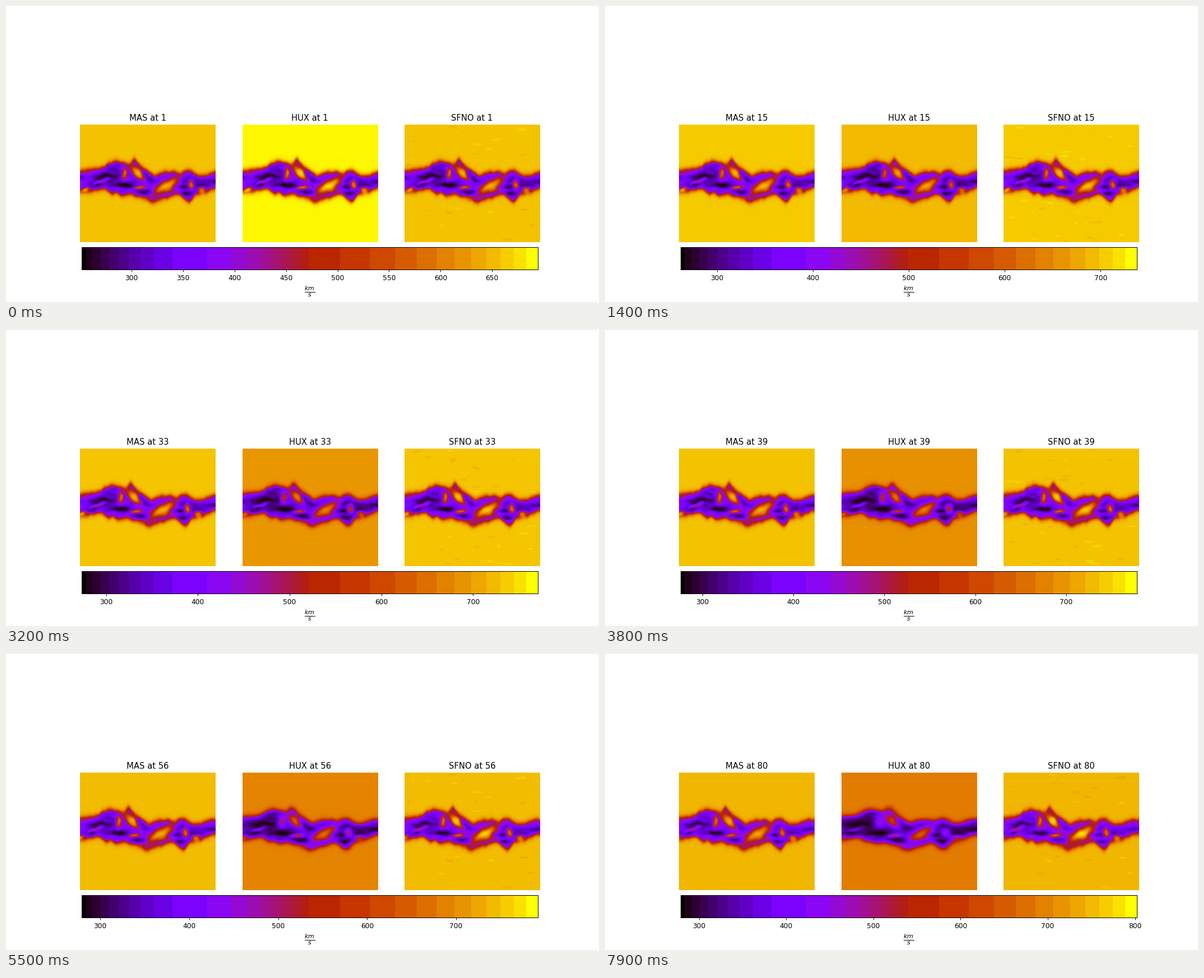
Animation, 1058 px wide and 529 px high, one loop 8 s. Source, as a matplotlib script:

```python
import numpy as np
import matplotlib.pyplot as plt
from matplotlib.animation import FuncAnimation

W, H = 1058, 529
FRAMES = 80
PW, PH, PAD = 242, 210, 40
LEFT, TOP = 132.25, 212.3
CELL = 0.775 * W / 3.4
LEVELS = 30

plt.rcParams["font.family"] = "DejaVu Sans"
rng = np.random.default_rng(4)

# Outline of the slow-wind belt, in stage pixels
UPPER = [(132, 296), (152, 291), (171, 291), (194, 276), (208, 281),
         (221, 281), (229, 274), (240, 287), (263, 303), (285, 297),
         (310, 299), (327, 294), (342, 302), (358, 303), (374, 296)]
LOWER = [(132, 331), (150, 333), (176, 325), (190, 336), (198, 331),
         (207, 339), (222, 337), (245, 341), (262, 351), (277, 343),
         (307, 335), (327, 351), (337, 336), (362, 330), (374, 322)]
# Fast-wind gaps: x, y, half length, half height, tilt, depth
GAPS = [(210, 298, 4, 8, 0, .8), (235, 299, 15, 6.5, .85, 1),
        (238, 325, 8, 3, -.1, .75), (285, 322, 23, 9, -.5, 1),
        (331, 320, 4, 7, .1, .8), (141, 328, 8, 4, -.4, .9),
        (170, 313, 13, 2.5, -.35, .4), (349, 330, 5, 6, .3, .8)]


def gnuplot(x):
    x = np.clip(x, 0, 1)
    blue = np.clip(np.sin(2 * np.pi * x), 0, 1)
    return np.stack([np.sqrt(x), x ** 3, blue], axis=-1)


def bar_colors():
    """Ramp cut into steps of equal colour distance."""
    x = np.linspace(0, 1, 815)
    step = np.diff(gnuplot(x) * [.8, 1, .6], axis=0)
    length = np.concatenate([[0], np.cumsum(np.linalg.norm(step, axis=1))])
    marks = np.linspace(0, length[-1], LEVELS + 1)
    edges = np.interp(marks, length, x)
    mids = (edges[1:] + edges[:-1]) / 2
    mids[0], mids[-1] = 0, 1
    return gnuplot(mids)[np.digitize(x, edges[1:-1])]


def smooth(a, sx, sy):
    fy = np.fft.fftfreq(a.shape[0])[:, None]
    fx = np.fft.fftfreq(a.shape[1])[None, :]
    g = np.exp(-2 * np.pi ** 2 * ((sx * fx) ** 2 + (sy * fy) ** 2))
    return np.fft.ifft2(np.fft.fft2(a) * g).real


def noise(sx, sy, shape):
    n = smooth(rng.standard_normal(shape), sx, sy)
    return n / n.std()


def sigmoid(z):
    return 1 / (1 + np.exp(-np.clip(z, -40, 40)))


def outline(points, x):
    y = np.interp(x, *zip(*points))
    kernel = np.exp(-np.linspace(-2, 2, 13) ** 2)
    y = np.convolve(np.pad(y, 6, mode="edge"), kernel / kernel.sum(), "valid")
    return y + .8 * noise(3, 0, (1, x.size))[0]


def build():
    """Relative wind speed, 0 slow to 1 fast, with room at both sides."""
    x = np.arange(-PAD, PW + PAD) + LEFT
    X, Y = np.meshgrid(x, np.arange(PH) + TOP)
    slow = (sigmoid((Y - outline(UPPER, x)) / 2.4)
            * sigmoid((outline(LOWER, x) - Y) / 2.4))
    Xw, Yw = X + noise(5, 5, X.shape), Y + noise(5, 5, X.shape)
    for cx, cy, a, b, tilt, depth in GAPS:
        c, s = np.cos(tilt), np.sin(tilt)
        u, v = Xw - cx, Yw - cy
        r = np.hypot((u * c + v * s) / a, (v * c - u * s) / b)
        slow *= 1 - depth * sigmoid(3.5 * (1 - r))
    core = np.exp(-((X - 185) / 22) ** 2 - ((Y - 297) / 9) ** 2)
    floor = np.clip(.14 + .07 * noise(8, 3, X.shape) - .1 * core, .02, 1)
    return 1 - slow * (1 - floor)


BASE = build()
NOISE_A, NOISE_B = noise(8, 2, (PH, PW)), noise(8, 2, (PH, PW))
GX, GY = np.meshgrid(np.arange(PW) + LEFT, np.arange(PH) + TOP)


def rise(i, tau):
    return 1 - np.exp(-i / tau)


def limits(i):
    low = 251.6 + 27.5 * np.sin(np.pi / 2 * min(i / 55, 1))
    return low, 694.6 + 116 * rise(i, 30)


def window(a, shift):
    n = int(shift)
    f = shift - n
    k = PAD + n
    return (1 - f) * a[:, k:k + PW] + f * a[:, k + 1:k + 1 + PW]


def bump(x, y, sx, sy):
    return np.exp(-((GX - x) / sx) ** 2 - ((GY - y) / sy) ** 2)


def panels(i):
    t = i / (FRAMES - 1)
    low, high = limits(i)
    shift = 14 * t ** .85
    fast = (657 + 92 * rise(i, 20) - low) / (high - low)
    mas = fast * window(BASE, shift) ** (1 - .15 * t)

    spread = smooth(BASE, .3 + 5 * t, .5 * t)
    hux = (691 - low) / (high - low) * window(spread, .88 * shift) ** (1 + .3 * t)
    hux *= 1 - .6 * t * bump(140, 299, 26, 9)

    ripple = NOISE_A * np.cos(.12 * i) + NOISE_B * np.sin(.12 * i)
    patch = .022 * np.sign(ripple) * (np.abs(ripple) > 2.3)
    sfno = fast * window(BASE, 1.06 * shift) ** (1 - .2 * t) + patch
    glow = bump(285 - shift, 320, 14, 9) + bump(232 - shift, 299, 8, 10)
    sfno += .1 * t * glow * (sfno > .7)
    return mas, hux, sfno


def place(x, y, w, h):
    return fig.add_axes([x / W, 1 - (y + h) / H, w / W, h / H])


fig = plt.figure(figsize=(12, 6), dpi=W / 12, facecolor="white")
names = ["MAS", "HUX", "SFNO"]
images, titles = [], []
for n in range(3):
    ax = place(LEFT + 1.2 * CELL * n, TOP, CELL, PH - .5)
    ax.axis("off")
    images.append(ax.imshow(np.ones((PH, PW, 3)), aspect="auto",
                            interpolation="nearest"))
    titles.append(ax.set_title(""))

bar = place(135, 430.9, 814.2, 40.1)
bar.imshow(bar_colors()[None], aspect="auto", extent=[0, 1, 0, 1],
           transform=bar.transAxes, interpolation="nearest")
bar.set_ylim(0, 1)
bar.set_yticks([])
fig.text(542 / W, 1 - 510.5 / H, r"$\frac{km}{s}$", fontsize=13,
         ha="center", va="center")


def draw(i):
    for name, image, title, x in zip(names, images, titles, panels(i)):
        image.set_data(gnuplot(x))
        title.set_text(f"{name} at {i + 1}")
    bar.set_xlim(*limits(i))
    return images + titles


anim = FuncAnimation(fig, draw, frames=FRAMES, interval=100, repeat=True,
                     repeat_delay=0, blit=False)
plt.show()
```
